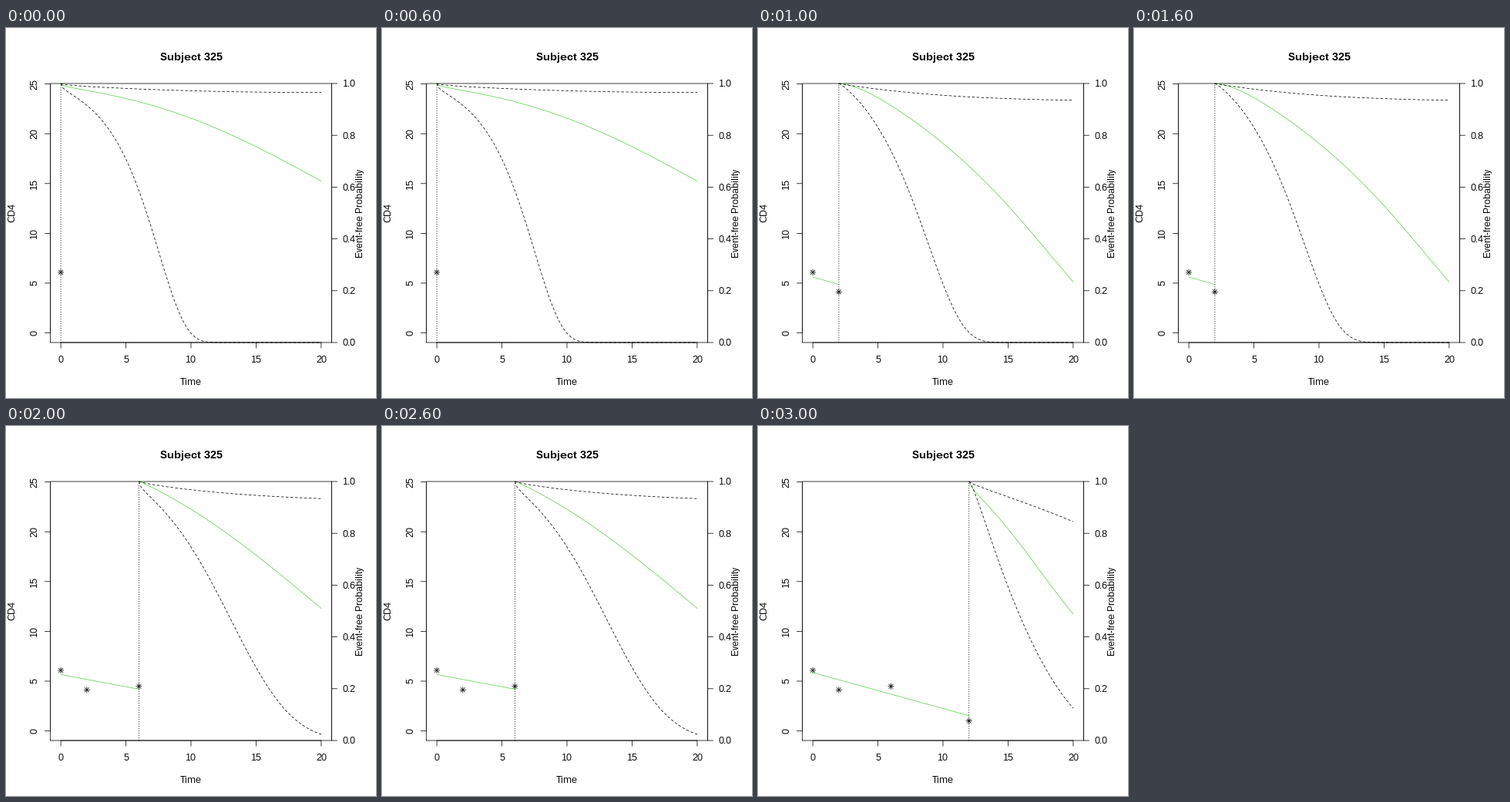
These frames come from a looping animation (480 by 480 pixels, 4 s). A matplotlib script:

```python
import numpy as np
import matplotlib.pyplot as plt
from matplotlib.animation import FuncAnimation

plt.rcParams.update({
    "font.family": "Liberation Sans",
    "font.size": 12,
    "text.hinting": "native",
    "text.hinting_factor": 1,  # whole-pixel letter widths
    "path.snap": False,
    "path.simplify": False,
})

SIZE, DPI = 480, 72  # at 72 dpi one point is one pixel
LEFT, RIGHT, TOP, BOTTOM = 57.6, 422.4, 72, 408
TICK, LINE_WIDTH = 7.2, 0.75
GREEN = "#61D04F"
DASHED, DOTTED = (0, (4, 4)), (0, (1, 3))
END = 20
CD4_MAX = 580 ** 0.5

VISITS = [0, 2, 6, 12]
CD4 = np.sqrt([37, 17, 20, 1])
# Fitted CD4 at time 0 and at the latest visit
FITS = [None, (5.62, 4.86), (5.66, 4.19), (5.85, 1.53)]

# Probabilities at equal steps from the latest visit up to a horizon
MEDIAN = [(0.942, 0.866, 0.756, 0.6235), (0.899, 0.726, 0.5, 0.234),
          (0.908, 0.791, 0.656, 0.51), (0.8765, 0.753, 0.618, 0.489)]
UPPER = [(0.981, 0.972, 0.967, 0.966), (0.9625, 0.9435, 0.9355),
         (0.9645, 0.9455, 0.934), (0.9465, 0.898, 0.845)]
LOWER = [(0.893, 0.708, 0.354, 0.036), (0.869, 0.631, 0.293, 0.039),
         (0.785, 0.473, 0.164, 0.024), (0.731, 0.47, 0.268, 0.125)]
LOWER_HORIZON = [10, 10, 14, 8]


def time_x(t):
    width = (RIGHT - LEFT) / 1.08
    return LEFT + width * (0.04 + np.asarray(t) / END)


def cd4_y(value):
    height = (BOTTOM - TOP) / 1.08
    return BOTTOM - height * (0.04 + np.asarray(value) / CD4_MAX)


def prob_y(p):
    return BOTTOM - (BOTTOM - TOP) * p


def survival(probs, horizon, elapsed):
    """Weibull-Gompertz type survival curve through the given probabilities."""
    n = len(probs)

    def basis(x):
        return np.column_stack([x ** 0, np.log(x), x, x ** 2])[:, :n]

    steps = np.arange(1, n + 1) / n
    coef = np.linalg.solve(basis(steps), np.log(-np.log(probs)))
    return np.exp(-np.exp(basis(elapsed / horizon) @ coef))


fig = plt.figure(figsize=(SIZE / DPI, SIZE / DPI), dpi=DPI, facecolor="white")
ax = fig.add_axes([0, 0, 1, 1])


def line(xs, ys, color="black", style="-"):
    ax.plot(xs, ys, color=color, lw=LINE_WIDTH, ls=style,
            solid_capstyle="round", solid_joinstyle="round",
            dash_capstyle="round", dash_joinstyle="round")


def label(x, y, text, rotation=0, ha="center", **font):
    ax.text(x, y, text, rotation=rotation, rotation_mode="anchor", ha=ha,
            va="baseline", **font)


def star(x, y):
    d, r = 2.7, 2.7 * 2 ** 0.5
    for dx, dy in [(d, d), (d, -d), (r, 0), (0, r)]:
        line([x - dx, x + dx], [y - dy, y + dy])


def draw_axes():
    line([LEFT, RIGHT, RIGHT, LEFT, LEFT], [BOTTOM, BOTTOM, TOP, TOP, BOTTOM])
    line(time_x([0, END]), [BOTTOM, BOTTOM])
    line([LEFT, LEFT], cd4_y([0, 25]))
    line([RIGHT, RIGHT], [BOTTOM, TOP])
    for t in range(0, END + 1, 5):
        x = time_x(t)
        line([x, x], [BOTTOM, BOTTOM + TICK])
        label(x, 433.9, str(t))
    for value in range(0, 26, 5):
        y = cd4_y(value)
        line([LEFT, LEFT - TICK], [y, y])
        label(40.3, y, str(value), rotation=90)
    for p in np.linspace(0, 1, 6):
        y = prob_y(p)
        line([RIGHT, RIGHT + TICK], [y, y])
        label(RIGHT + 14.4, y + 4.3, f"{p:.1f}", ha="left")
    label(240, 41.8, "Subject 325", fontsize=14.4, weight="bold")
    label(240, 462.7, "Time")
    label(11.5, 240, "CD4", rotation=90)
    label(462.9, 240, "Event-free Probability", rotation=90)


def draw(frame):
    ax.clear()
    ax.set(xlim=(0, SIZE), ylim=(SIZE, 0))
    ax.axis("off")
    draw_axes()

    now = VISITS[frame]
    for t, value in zip(VISITS[:frame + 1], CD4):
        star(time_x(t), cd4_y(value))
    if FITS[frame]:
        line(time_x([0, now]), cd4_y(FITS[frame]), GREEN)
    line([time_x(now)] * 2, [BOTTOM, TOP], style=DOTTED)

    left = END - now
    elapsed = np.linspace(1e-6, left, 120)
    for probs, horizon, color, style in [
            (MEDIAN, left, GREEN, "-"),
            (LOWER, LOWER_HORIZON[frame], "black", DASHED),
            (UPPER, left, "black", DASHED)]:
        p = survival(probs[frame], horizon, elapsed)
        line(time_x(now + elapsed), prob_y(p), color, style)
    return []


anim = FuncAnimation(fig, draw, frames=len(VISITS), interval=1000,
                     init_func=lambda: [], repeat=True, repeat_delay=0)
plt.show()
```
